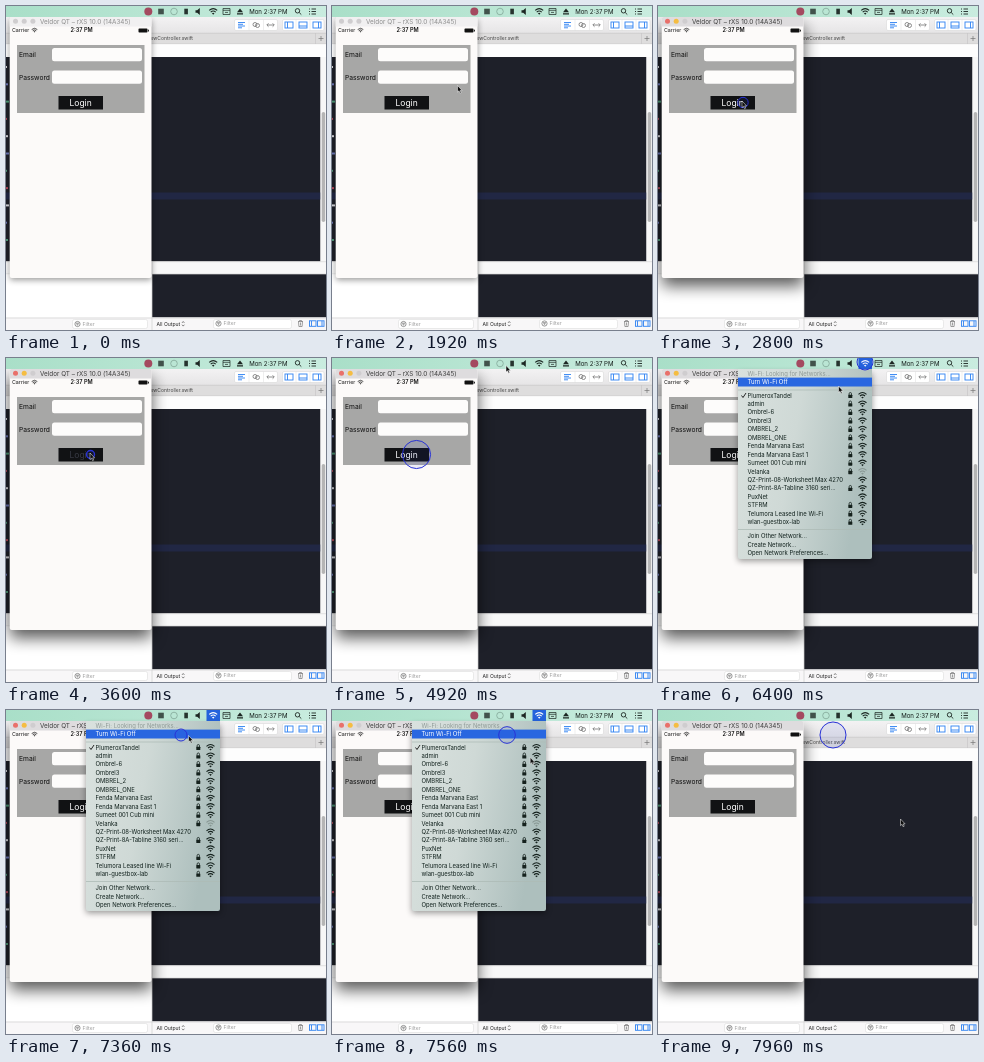
Write an HTML page that moves like this. It is 320 by 324 pixels and loops after 8 s.

```html
<!DOCTYPE html>
<html lang="en">
<head>
<meta charset="utf-8">
<title>Login form and network menu</title>
<style>
html, body { margin: 0; width: 320px; height: 324px; overflow: hidden; background: #fff; }
svg { display: block; font-family: Inter, Roboto, sans-serif; font-size: 5.9px; }
text { white-space: pre; }
.line { fill: none; stroke: currentColor; }
</style>
</head>
<body>
<svg width="320" height="324" viewBox="0 0 320 324">
  <defs>
    <linearGradient id="mint">
      <stop offset="0" stop-color="#a9dfc8"/><stop offset="1" stop-color="#c9ecdf"/>
    </linearGradient>
    <linearGradient id="glass" x2="1" y2=".25">
      <stop offset="0" stop-color="#d9e1de"/><stop offset=".48" stop-color="#cfd9d6"/>
      <stop offset="1" stop-color="#adbfbd"/>
    </linearGradient>
    <linearGradient id="bar" x2="0" y2="1">
      <stop offset="0" stop-color="#f3f2f3"/><stop offset="1" stop-color="#e6e5e6"/>
    </linearGradient>
    <filter id="soft" x="-30%" y="-30%" width="160%" height="160%"><feGaussianBlur stdDeviation="3"/></filter>
    <filter id="deep" x="-30%" y="-30%" width="160%" height="160%"><feGaussianBlur stdDeviation="8"/></filter>
    <clipPath id="desk"><rect y="11" width="320" height="313"/></clipPath>
    <g id="wifi">
      <path class="line" stroke-width="1.05" d="M-4-1.1Q0-4.7 4-1.1M-2.5.6Q0-1.6 2.5.6"/>
      <path fill="currentColor" d="M-1.3 1.8Q0 .7 1.3 1.8L0 3.2Z"/>
    </g>
    <g id="lock">
      <rect x="-2" y="-.6" width="4" height="3.3" rx=".4" fill="currentColor"/>
      <path class="line" stroke-width=".8" d="M-1.2-.4V-1.6Q-1.2-2.9 0-2.9T1.2-1.6V-.4"/>
    </g>
    <g id="funnel">
      <circle class="line" r="2.6" stroke-width=".7"/>
      <path class="line" stroke-width=".7" d="M-1.5-.8H1.5M-1 .2H1M-.4 1.1H.4"/>
    </g>
  </defs>

  <g clip-path="url(#desk)">
    <!-- editor window -->
    <rect y="11" width="320" height="16" fill="url(#bar)"/>
    <rect y="27" width="320" height="11" fill="#dedddd"/>
    <path d="M0 27.2H320M0 38H320" stroke="#c4c3c4" stroke-width=".6"/>
    <rect y="38.3" width="320" height="12.7" fill="#fdfdfd"/>
    <g fill="#fff" stroke="#d2d2d2" stroke-width=".5">
      <rect x="228.500" y="13.500" width="43" height="11" rx="1.500"/>
      <rect x="276.500" y="13.500" width="41.500" height="11" rx="1.500"/>
    </g>
    <path d="M243 13.500V24.500M257.500 13.500V24.500M290 13.500V24.500M304 13.500V24.500" stroke="#dcdcdc" stroke-width=".5"/>
    <path class="line" color="#2e82f2" stroke-width=".9" d="M232 16.500H239M232 18.300H237M232 20H239M232 21.800H236"/>
    <g class="line" color="#737373" stroke-width=".8">
      <circle cx="249" cy="18.500" r="2"/><circle cx="251.500" cy="19.500" r="2"/>
      <path d="M261 19H268M262.500 17.300L260.800 19L262.500 20.700M266.600 17.300L268.300 19L266.600 20.700"/>
    </g>
    <g class="line" color="#2e82f2" stroke-width=".9">
      <rect x="279" y="16" width="8" height="6"/><path d="M281.500 16V22"/>
      <rect x="293" y="16" width="8" height="6"/><path d="M293 20H301"/>
      <rect x="307" y="16" width="8" height="6"/><path d="M312.500 16V22"/>
    </g>
    <text x="187" y="34.300" font-size="5" text-anchor="end" fill="#444">ViewController.swift</text>
    <path d="M309.500 27V38" stroke="#c4c3c4" stroke-width=".6"/>
    <path d="M312.500 32.500H317.500M315 30V35" stroke="#777" stroke-width=".7"/>
    <rect y="51" width="314.500" height="204.500" fill="#1e2029"/>
    <rect y="186.500" width="314.500" height="7" fill="#212744"/>
    <g id="code"></g>
    <rect x="314.500" y="51" width="5.500" height="204.500" fill="#f7f7f7"/>
    <rect x="315.700" y="106" width="3.500" height="110" rx="1.750" fill="#b5b5b5"/>
    <rect y="255.500" width="320" height="13" fill="#f8f8f8"/>
    <path d="M0 255.700H320M0 268H320" stroke="#d0d0d0" stroke-width=".6"/>
    <rect y="268.300" width="146" height="44" fill="#fff"/>
    <rect x="146" y="268.300" width="174" height="43.200" fill="#1e2029"/>
    <rect y="311.500" width="320" height="12.500" fill="#f8f7f8"/>
    <path d="M0 312H320M146 256V324" stroke="#cfcfcf" stroke-width=".7"/>
    <g fill="#fff" stroke="#d6d6d6" stroke-width=".5">
      <rect x="66.500" y="313.500" width="75" height="9" rx="2"/>
      <rect x="207.500" y="313.500" width="78" height="9" rx="2"/>
    </g>
    <g color="#6e6e6e"><use href="#funnel" x="71.500" y="318"/><use href="#funnel" x="212.500" y="317.500"/></g>
    <g font-size="5.100" fill="#9a9a9a"><text x="76.500" y="319.900">Filter</text><text x="217.500" y="319.400">Filter</text></g>
    <text x="150.500" y="319.700" font-size="5.100" fill="#222">All Output</text>
    <path class="line" color="#333" stroke-width=".6" d="M176 316.900L177.200 315.500L178.400 316.900M176 318.700L177.200 320.100L178.400 318.700"/>
    <path class="line" color="#777" stroke-width=".7" d="M292 315.500H297M293.500 315.500V314.500H295.500V315.500M292.500 315.500L292.900 320.500H296.100L296.500 315.500M294.500 316.500V319.500"/>
    <g fill="none" stroke="#2e82f2" stroke-width=".9">
      <rect x="303.500" y="314.800" width="6.500" height="5.500"/><path d="M305.500 315V320"/>
      <rect x="311.500" y="314.800" width="6.500" height="5.500"/><path d="M316 315V320"/>
    </g>

    <!-- simulator window -->
    <rect id="idleShade" x="4" y="14" width="141.500" height="260" fill="#000" opacity=".4" filter="url(#soft)"/>
    <rect id="liveShade" x="4" y="20" width="141.500" height="260" fill="#000" opacity=".65" filter="url(#deep)"/>
    <rect x="3.700" y="11" width="141.800" height="261" rx="2" fill="#fcfaf9"/>
    <path id="titleBar" d="M3.700 20.500V13Q3.700 11 5.700 11H143.500Q145.500 11 145.500 13V20.500Z"/>
    <circle id="dotA" cx="9.500" cy="15.300" r="2.500"/>
    <circle id="dotB" cx="18.200" cy="15.300" r="2.500"/>
    <circle cx="26.900" cy="15.300" r="2.500" fill="#cfcdcf"/>
    <text id="title" x="34" y="17.600" font-size="6.350">Veldor QT – rXS 10.0 (14A345)</text>
    <text x="6" y="26.400" font-size="5.300" fill="#111">Carrier</text>
    <use href="#wifi" transform="translate(28.500 24.300) scale(.7)" color="#111"/>
    <text x="64.500" y="26.400" font-size="5.600" font-weight="600" fill="#111">2:37 PM</text>
    <rect x="132.500" y="22.600" width="9" height="4" rx=".8" fill="#111"/><rect x="142" y="23.700" width=".9" height="1.800" fill="#111"/>
    <rect x="11" y="39" width="127.500" height="68" fill="#a7a7a6"/>
    <g fill="#fdfcfb">
      <rect x="46" y="42" width="90" height="13.300" rx="2.500"/>
      <rect x="46" y="64.500" width="90" height="13.300" rx="2.500"/>
    </g>
    <g font-size="6.700" fill="#0c0c0c"><text x="13" y="51.200">Email</text><text x="13" y="73.500">Password</text></g>
    <rect x="52.500" y="90" width="44.500" height="13.500" fill="#111214"/>
    <text id="login" x="63.500" y="100" font-size="8.500">Login</text>
  </g>

  <!-- system menu bar -->
  <rect width="320" height="11" fill="url(#mint)"/>
  <circle cx="142.300" cy="5.500" r="4" fill="#a44a60"/>
  <rect x="152.200" y="2.700" width="5.600" height="5.600" fill="#41524b"/>
  <circle class="line" color="#83a898" cx="168" cy="5.500" r="3.300" stroke-width=".8"/>
  <rect x="178.300" y="2.700" width="3.600" height="5.600" fill="#26332e"/>
  <path d="M189.500 4.300H191.200L193.800 2V9L191.200 6.700H189.500Z" fill="#1c2622"/>
  <path class="line" color="#1c2622" stroke-width=".7" d="M217 2.500H224V8.500H217ZM217 4.300H224M219 6.400H222"/>
  <path d="M231 6.300L234 2.500L237 6.300ZM231 7.300H237V8.400H231Z" fill="#1c2622"/>
  <text x="243.200" y="7.800" font-size="6.100" fill="#121a17">Mon 2:37 PM</text>
  <g class="line" color="#1c2622" stroke-width=".9">
    <circle cx="291.500" cy="4.800" r="2.200"/><path d="M293.200 6.500L295.300 8.600"/>
    <path d="M303 3H304M305.500 3H310M303 5.500H304M305.500 5.500H310M303 8H304M305.500 8H310"/>
  </g>
  <rect id="barPick" x="200.500" width="13.500" height="11" fill="#2463dc"/>
  <use id="barWifi" href="#wifi" x="207.200" y="5.500"/>

  <!-- network menu -->
  <g id="menu">
    <rect x="80" y="15" width="134" height="188" fill="#000" opacity=".4" filter="url(#soft)"/>
    <path d="M80 11H214V199Q214 201 212 201H82Q80 201 80 199Z" fill="url(#glass)"/>
    <text x="89.500" y="18.100" fill="#8f9a97">Wi-Fi: Looking for Networks...</text>
    <rect id="pick" x="80" y="19.600" width="134" height="8.900" fill="#2967e0"/>
    <text id="toggle" x="89.500" y="26.200" font-size="6">Turn Wi-Fi Off</text>
    <path d="M80 32H214M80 171.500H214" stroke="#aebbb7" stroke-width=".8"/>
    <path class="line" color="#111" stroke-width=".9" d="M83.500 37.500L85 39.500L88 35"/>
    <g id="nets" fill="#10201c" color="#15211d"></g>
  </g>

  <g id="rings" fill="#2a3ae0" fill-opacity=".08" stroke="#2832d6"></g>
  <path id="cursor" d="M0 0V6.600L1.500 5.300L2.600 7.700L3.700 7.200L2.600 4.900H4.600Z" fill="#0b0b0b" stroke="#fff" stroke-width=".5"/>
</svg>
<script>
const LOOP = 8000;
const $ = id => document.getElementById(id);

function add(parent, tag, attrs, label) {
  const node = document.createElementNS("http://www.w3.org/2000/svg", tag);
  for (const key in attrs) node.setAttribute(key, attrs[key]);
  if (label) node.textContent = label;
  return parent.appendChild(node);
}

// slivers of code left of the simulator
const inks = ["#d8d8dc", "#b5485a", "#4f9a78", "#6d78b8"];
for (let i = 0; i < 11; i++) {
  add($("code"), "rect", { x: 0, y: 60 + i * 17.3, width: 1 + i * 7 % 3, height: 2, fill: inks[i * 3 % 4] });
}

const networks = [
  "PlumeroxTandel", "admin", "Ombrel-6", "Ombrel3", "OMBREL_2", "OMBREL_ONE",
  "Fenda Marvana East", "Fenda Marvana East 1", "Sumeet 001 Cub mini", "Velanka",
  "QZ-Print-08-Worksheet Max 4270", "QZ-Print-8A-Tabline 3160 seri...",
  "PuxNet", "STFRM", "Telumora Leased line Wi-Fi", "wlan-guestbox-lab"
];
const unlocked = [10, 12], weak = 9;
networks.forEach((name, i) => {
  const y = 37.4 + i * 8.45;
  add($("nets"), "text", { x: 89.5, y: y + 2.1 }, name);
  if (!unlocked.includes(i)) add($("nets"), "use", { href: "#lock", x: 192.3, y });
  add($("nets"), "use", { href: "#wifi", x: 204.5, y, color: i === weak ? "#879692" : "#15211d" });
});
["Join Other Network...", "Create Network...", "Open Network Preferences..."].forEach((name, i) =>
  add($("nets"), "text", { x: 89.5, y: 180.3 + i * 8.5 }, name));

// time, x, y of the pointer tip
const path = [
  [1200, 204, 150], [1920, 125.5, 79.5], [2400, 84, 95], [4200, 84, 95],
  [4920, 174, 7.5], [5500, 206, 4], [6000, 206, 4], [6350, 180.5, 28],
  [6750, 180.5, 28], [7000, 175, 25], [7240, 175, 25], [7360, 182.5, 25.5], [7960, 242.5, 109]
];

// each click: centre, press, release, end
const clicks = [
  { x: 85, y: 96.5, down: 2600, up: 2700, end: 3480 },
  { x: 84.5, y: 96.5, down: 3520, up: 4060, end: 5560 },
  { x: 207, y: 4, down: 5760, up: 6060, end: 7040 },
  { x: 175, y: 25, down: 7080, up: 7190, end: 8200 }
];
for (const c of clicks) c.node = add($("rings"), "circle", { cx: c.x, cy: c.y });

const clamp = v => Math.max(0, Math.min(1, v));
const ease = v => v * v * (3 - 2 * v);
const paint = (id, color) => $(id).setAttribute("fill", color);

function pointer(t) {
  const i = path.findIndex(p => p[0] > t);
  if (i < 0) return path[path.length - 1].slice(1);
  if (i === 0) return path[0].slice(1);
  const [t0, x0, y0] = path[i - 1], [t1, x1, y1] = path[i];
  const k = ease((t - t0) / (t1 - t0));
  return [x0 + (x1 - x0) * k, y0 + (y1 - y0) * k];
}

function render(t) {
  const [x, y] = pointer(t);
  $("cursor").setAttribute("transform", `translate(${x} ${y})`);
  $("cursor").setAttribute("opacity", t < 1200 ? 0 : 1);

  const live = t >= 2600;
  $("idleShade").setAttribute("visibility", live ? "hidden" : "visible");
  $("liveShade").setAttribute("visibility", live ? "visible" : "hidden");
  paint("titleBar", live ? "#dedcde" : "#f1f0f1");
  paint("dotA", live ? "#e9706a" : "#cfcdcf");
  paint("dotB", live ? "#f5bd42" : "#cfcdcf");
  paint("title", live ? "#3c3c3c" : "#8d8d8d");
  paint("login", t >= 3520 && t < 4060 ? "#383a44" : "#fff");

  const shown = t < 5800 ? 0 : 1 - clamp((t - 7680) / 200);
  const picked = y > 19.6;
  $("menu").setAttribute("opacity", shown);
  $("barPick").setAttribute("opacity", shown);
  $("barWifi").setAttribute("color", shown > .5 ? "#fff" : "#1c2622");
  $("pick").setAttribute("opacity", picked ? 1 : 0);
  paint("toggle", picked ? "#fff" : "#10201c");

  for (const c of clicks) {
    const on = t >= c.down && t < c.end;
    c.node.setAttribute("r", 4 + Math.max(0, t - c.up) * .0117);
    c.node.setAttribute("stroke-width", t < c.up ? 1.4 : 1);
    c.node.setAttribute("opacity", on ? clamp((c.end - t) / 200) : 0);
  }
}

const start = performance.now();
function tick() {
  render((performance.now() - start) % LOOP);
  requestAnimationFrame(tick);
}
tick();
</script>
</body>
</html>
```
